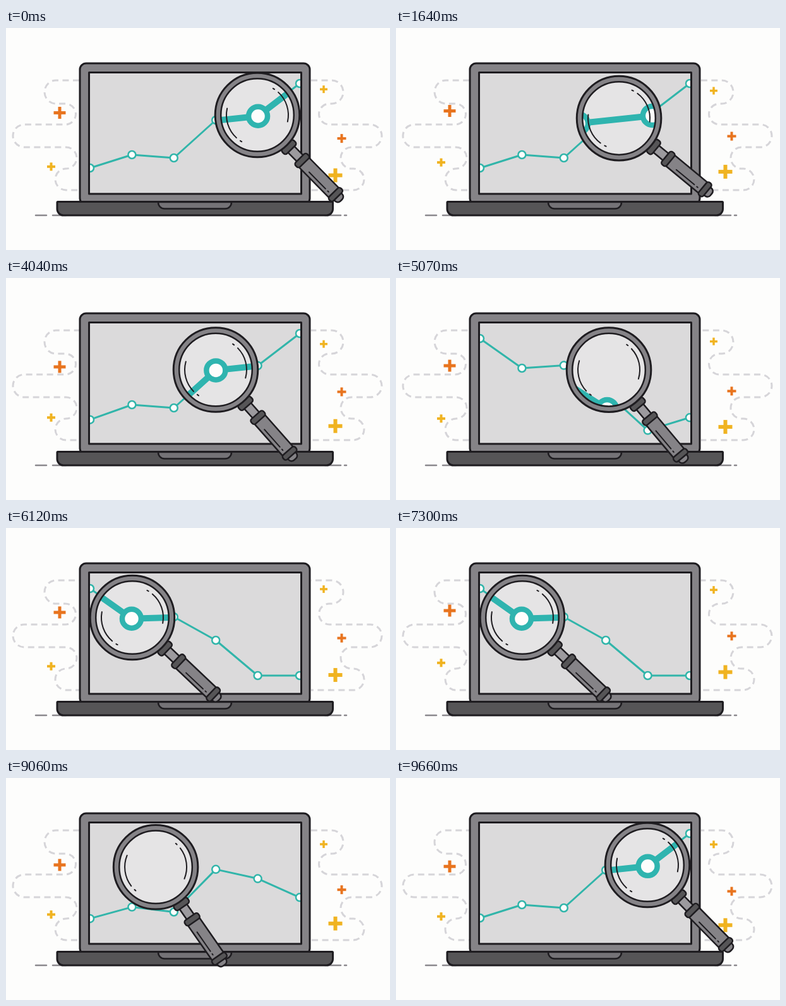
Recreate the animation shown at these times as an HTML page with a canvas. Size 608 by 352 pixels, loop 9690 ms.

```html
<!DOCTYPE html>
<html lang="en">
<head>
<meta charset="utf-8">
<title>Chart under a magnifying glass</title>
<style>
html, body { margin: 0; width: 100%; height: 100%; overflow: hidden; background: #fdfdfc; }
canvas { display: block; }
</style>
</head>
<body>
<canvas id="stage" width="608" height="352"></canvas>
<script>
const ctx = document.getElementById('stage').getContext('2d');
const LOOP = 9690, TAU = Math.PI * 2, RAD = Math.PI / 180;
const INK = '#1e1c20', GRAY = '#858387', DARK = '#565557', PAPER = '#fdfdfc';
const SCREEN = '#dbdadb', GLASS = '#e5e4e5', TEAL = '#2fb4af', THIN = '#31b5aa';
const ORANGE = '#e8741f', YELLOW = '#f0b321';
const ZOOM = 1.76;

// Chart heights at six evenly spaced columns
const RISING = [222, 201, 206, 146, 139, 88];
const FALLING = [96, 143, 141, 178, 234, 234];
const columnX = i => 133 + i * 66.4;

// Lens rest poses and the start of each one-second move
const HOME = { x: 398, y: 138, angle: 45.5 };
const MIDDLE = { x: 332, y: 145.5, angle: 48.5 };
const LEFT = { x: 200, y: 142, angle: 43.5 };
const MOVES = [
  { start: 1105, from: HOME, to: MIDDLE },
  { start: 4970, from: MIDDLE, to: LEFT },
  { start: 8630, from: LEFT, to: HOME }
];
// The magnified view and the handle trail behind the lens (ms)
const VIEW_LAG = 46, SWING_LAG = 30, SWING = .021;

// x, mid y, amplitude, phase of lowest point, half size, thickness, colour
const PLUSES = [
  [85, 136, 5, .7, 9.5, 5, ORANGE],
  [71.5, 218, 5, .81, 6.5, 4, YELLOW],
  [503, 101, 4.4, .58, 6, 3.5, YELLOW],
  [531.5, 176, 4.7, .72, 7, 4, ORANGE],
  [521.5, 232, 4.2, .81, 11, 6, YELLOW]
];

const mix = (a, b, k) => a + (b - a) * k;
const progress = (t, start) => Math.min(1, Math.max(0, (t - start) / 1000));

function backInOut(p) {
  const s = 2.595, q = 2 * p, u = q - 2;
  return q < 1 ? q * q * ((s + 1) * q - s) / 2 : (u * u * ((s + 1) * u + s) + 2) / 2;
}

function poseAt(t) {
  const move = MOVES.filter(m => t >= m.start).pop() || MOVES[0];
  const k = backInOut(progress(t, move.start));
  const pose = {};
  for (const key in HOME) pose[key] = mix(move.from[key], move.to[key], k);
  return pose;
}

function tiltAt(t) {
  const late = t - SWING_LAG;
  const speed = (poseAt(late + 5).x - poseAt(late - 5).x) * 100;
  return (poseAt(late).angle + speed * SWING) * RAD;
}

function chartAt(t) {
  return RISING.map((high, i) => {
    const fall = backInOut(progress(t, 3970 + i * 100));
    const rise = backInOut(progress(t, 8100 + i * 100));
    return { x: columnX(i), y: mix(high, FALLING[i], fall - rise) };
  });
}

function paint(fill, stroke, width = 3) {
  if (fill) { ctx.fillStyle = fill; ctx.fill(); }
  if (stroke) { ctx.strokeStyle = stroke; ctx.lineWidth = width; ctx.stroke(); }
}

function box(x, y, w, h, radius, fill, stroke = INK, width = 3) {
  ctx.beginPath();
  ctx.roundRect(x, y, w, h, radius);
  paint(fill, stroke, width);
}

function circle(x, y, r, fill, stroke, width) {
  ctx.beginPath();
  ctx.arc(x, y, r, 0, TAU);
  paint(fill, stroke, width);
}

function line(x1, y1, x2, y2, color, width) {
  ctx.beginPath();
  ctx.moveTo(x1, y1);
  ctx.lineTo(x2, y2);
  paint(null, color, width);
}

function arc(r, from, to, width) {
  ctx.beginPath();
  ctx.arc(0, 0, r, from * RAD, to * RAD);
  paint(null, INK, width);
}

function drawTrails(t) {
  ctx.save();
  ctx.setLineDash([10, 6.5]);
  ctx.lineDashOffset = -t * .02;
  for (const d of [
    'M116 83H79A18 18.5 0 0 0 79 120H94A16.5 16.5 0 0 1 94 153H29A18 18 0 0 0 29 189H95A17 17 0 0 1 95 223A17 17 0 0 0 95 257H116',
    'M483 83H516A18 18.5 0 0 1 516 120H512A16.5 16.5 0 0 0 512 153H577A18 18 0 0 1 577 189H547A17 17 0 0 0 547 223H550A17 17 0 0 1 550 257H483'
  ]) {
    ctx.strokeStyle = '#d6d5d9';
    ctx.lineWidth = 3;
    ctx.stroke(new Path2D(d));
  }
  ctx.restore();
}

function drawPluses(t) {
  for (const [x, mid, amplitude, phase, half, thick, color] of PLUSES) {
    const y = mid + amplitude * Math.cos(TAU * (t / 6000 - phase));
    line(x - half, y, x + half, y, color, thick);
    line(x, y - half, x, y + half, color, thick);
  }
}

function drawChart(points, color, lineWidth, radius, ringWidth) {
  ctx.beginPath();
  for (const p of points) ctx.lineTo(p.x, p.y);
  paint(null, color, lineWidth);
  for (const p of points) circle(p.x, p.y, radius, PAPER, color, ringWidth);
}

function drawLaptop(points) {
  for (const [from, to] of [[47, 64], [74, 95], [505, 530], [536, 539]]) {
    line(from, 297, to, 297, '#8a888d', 2.5);
  }
  box(117, 56, 364, 224, 10, GRAY);
  box(131.5, 70.5, 336, 192.5, 0, SCREEN, null);
  ctx.save();
  ctx.beginPath();
  ctx.rect(131.5, 70.5, 336, 192.5);
  ctx.clip();
  drawChart(points, THIN, 3, 6, 2.5);
  ctx.restore();
  box(131.5, 70.5, 336, 192.5, 0, null);
  box(81, 275.5, 436.5, 21.5, [1, 1, 10, 10], DARK);
  box(241, 276, 116, 10.5, [0, 0, 10, 10], '#757377', INK, 2.5);
}

function drawHandle() {
  box(76, -7, 22, 14, 0, '#9c9a9e', INK, 2.5);
  box(180, -8, 9.5, 16, [0, 6, 6, 0], GRAY, INK, 2.5);
  box(103, -11, 73, 22, 0, GRAY, INK, 2.5);
  line(122, 5, 159, 5, INK, 2);
  line(164, 5, 166, 5, INK, 2);
  box(66, -13, 10.5, 26, 4, DARK, INK, 2.5);
  box(96, -13, 10, 26, 4, DARK, INK, 2.5);
  box(172, -13, 9.5, 26, 4, DARK, INK, 2.5);
}

function drawLens(t, points) {
  const pose = poseAt(t), focus = poseAt(t - VIEW_LAG), tilt = tiltAt(t);
  ctx.save();
  ctx.translate(pose.x, pose.y);

  ctx.save();
  ctx.rotate(tilt);
  drawHandle();
  ctx.restore();

  circle(0, 0, 66.8, GRAY, INK, 3);
  circle(0, 0, 57.8, GLASS);
  ctx.save();
  ctx.clip();
  const zoomed = points.map(p => ({ x: (p.x - focus.x) * ZOOM, y: (p.y - focus.y) * ZOOM }));
  drawChart(zoomed, TEAL, 10, 15, 8.5);
  ctx.restore();
  circle(0, 0, 57.8, null, INK, 2.5);

  ctx.rotate(tilt);
  for (const turn of [0, 180]) {
    arc(49, turn - 93, turn - 33, 2);
    arc(49, turn - 105, turn - 102, 2);
  }
  ctx.restore();
}

function draw(t) {
  ctx.fillStyle = PAPER;
  ctx.fillRect(0, 0, 608, 352);
  ctx.lineCap = 'butt';
  drawTrails(t);
  drawPluses(t);
  ctx.lineCap = 'round';
  ctx.lineJoin = 'round';
  const points = chartAt(t);
  drawLaptop(points);
  drawLens(t, points);
}

function frame() {
  draw(performance.now() % LOOP);
  requestAnimationFrame(frame);
}
frame();
</script>
</body>
</html>
```
